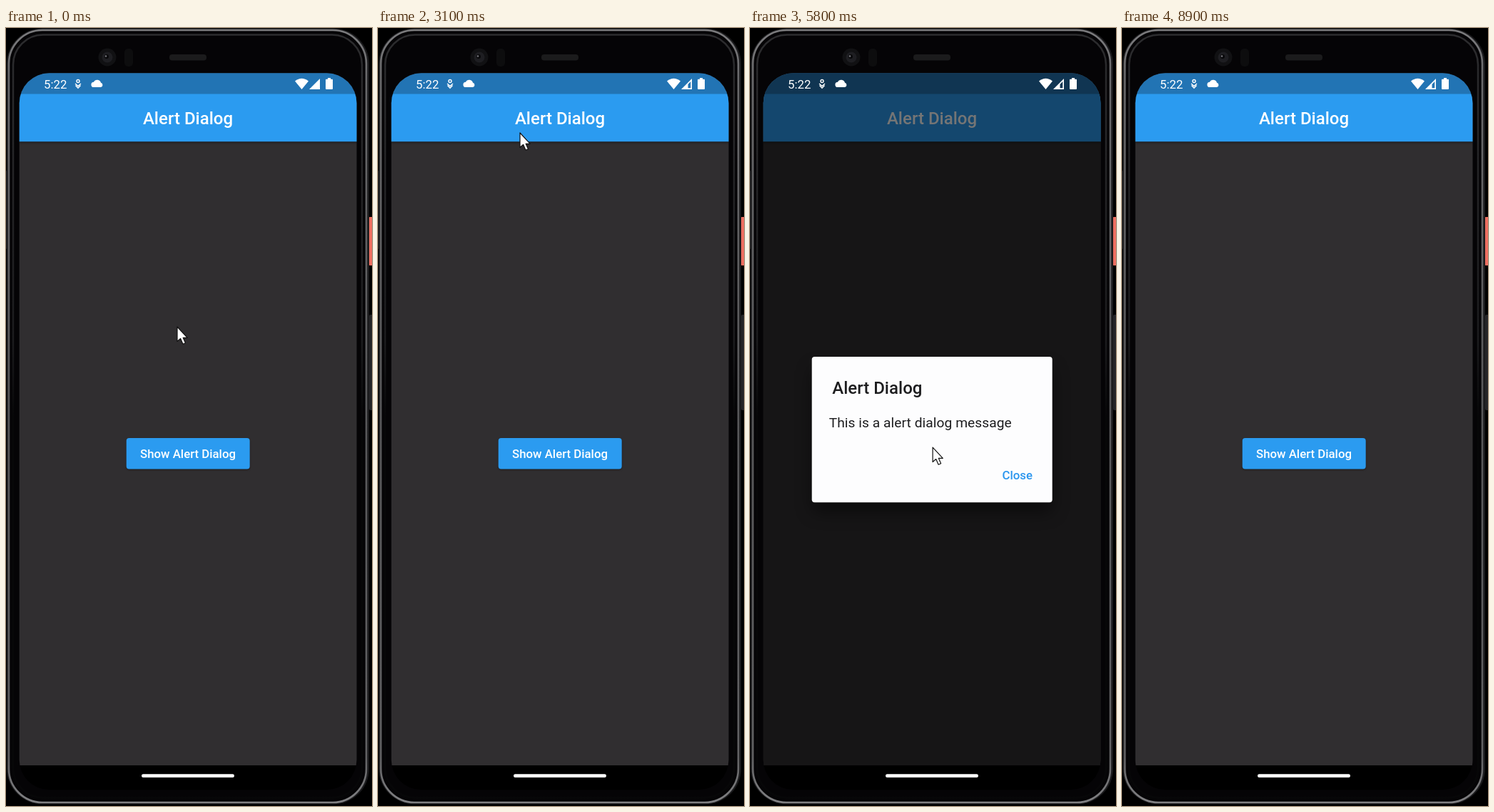
An HTML page that plays this animation: 513 px wide and 1091 px high, repeating every 9 s.

```html
<!DOCTYPE html>
<html lang="en">
<head>
<meta charset="utf-8">
<title>Alert Dialog</title>
<style>
  html, body { margin: 0; width: 100%; height: 100%; overflow: hidden; background: #000; }
  svg { display: block; width: 513px; height: 1091px; font-family: Roboto, sans-serif; }
  .medium { font-weight: 500; }
  .title { font-size: 24px; }
  .label { font-size: 16.8px; }
</style>
</head>
<body>
<svg viewBox="0 0 513 1091">
  <defs>
    <linearGradient id="edge" x2="0" y2="1">
      <stop offset="0" stop-color="#7c7c7e"/>
      <stop offset=".06" stop-color="#6a6a6c"/>
      <stop offset=".5" stop-color="#58585a"/>
      <stop offset=".94" stop-color="#626264"/>
      <stop offset="1" stop-color="#808082"/>
    </linearGradient>
    <linearGradient id="shine" x2="0" y2="1">
      <stop offset="0" stop-color="#2c2c2e"/>
      <stop offset=".4" stop-color="#1c1c1e"/>
      <stop offset=".5" stop-color="#070708"/>
    </linearGradient>
    <filter id="soft" x="-20%" y="-50%" width="140%" height="200%"><feGaussianBlur stdDeviation="1.5"/></filter>
    <filter id="deep" x="-20%" y="-30%" width="140%" height="160%"><feGaussianBlur stdDeviation="12"/></filter>
    <clipPath id="screen"><rect x="18.7" y="63.3" width="472.8" height="1005" rx="42"/></clipPath>
  </defs>

  <!-- phone body -->
  <rect x="0" y="200" width="3" height="110" rx="1" fill="#1d1d20"/>
  <rect x="508" y="265" width="8" height="68" rx="2" fill="#ed6e60"/>
  <rect x="509" y="402" width="8" height="134" rx="2" fill="#252528"/>
  <rect x="1" y="0.5" width="508" height="1088" rx="50" fill="#1b1b1d"/>
  <rect x="4" y="3" width="501" height="1083" rx="47" fill="#050406" stroke="url(#edge)" stroke-width="2.6"/>
  <rect x="10" y="9.500" width="489" height="1070" rx="42" fill="#050406" stroke="url(#shine)" stroke-width="2.500"/>
  <circle cx="142" cy="41" r="12.5" fill="#111113"/>
  <circle cx="142" cy="41" r="7.5" fill="#1e1e22"/>
  <circle cx="141" cy="40" r="3" fill="#08080a"/>
  <circle cx="140" cy="39.5" r="1.3" fill="#77777d"/>
  <rect x="166" y="29" width="12" height="25" rx="5" fill="#0d0d0e"/>
  <rect x="229" y="37" width="52" height="8.5" rx="4" fill="#1b1b1c"/>

  <!-- app -->
  <g clip-path="url(#screen)">
    <rect x="18" y="63" width="474" height="971" fill="#302e30"/>
    <rect x="18" y="154" width="474" height="6.500" opacity=".5" filter="url(#soft)"/>
    <rect x="18" y="63" width="474" height="30" fill="#2274b4"/>
    <rect x="18" y="92.500" width="474" height="66.800" fill="#2b9bf0"/>
    <text class="title medium" x="255" y="135" text-anchor="middle" fill="#fff">Alert Dialog</text>
    <rect x="169" y="576.500" width="172.500" height="43" rx="4" opacity=".4" filter="url(#soft)"/>
    <rect x="168.700" y="575" width="173" height="43.500" rx="4" fill="#2b9bf0"/>
    <text class="label medium" x="255" y="603" text-anchor="middle" fill="#fff">Show Alert Dialog</text>
    <rect id="dim" x="18" y="63" width="474" height="971" opacity="0"/>
    <rect x="18" y="1034" width="474" height="40"/>
  </g>
  <rect x="190" y="1046.300" width="130" height="4.700" rx="2.350" fill="#fff"/>

  <!-- status bar -->
  <g fill="#fff">
    <text class="label" x="53" y="85">5:22</text>
    <g fill="none" stroke="#fff" stroke-width="1.4">
      <circle cx="101" cy="74.5" r="2"/>
      <path d="M97 78l4 3.5 4-3.5M97.5 80.5l3.5 3.7 3.5-3.7"/>
    </g>
    <path d="M123 83a3.6 3.6 0 0 1 0-7.2a5.3 5.3 0 0 1 10 1a3.2 3.2 0 0 1 0 6.2z"/>
    <path d="M405 74.500q9.500-7.500 19 0l-9.500 11.500z"/>
    <path d="M425 86L440 71V86z"/>
    <path id="weak" d="M434.500 79L438.300 75V84.300H434.500z" fill="#2274b4"/>
    <path d="M451 70h4v1.800h2q1 0 1 1v12.200q0 1-1 1h-8q-1 0-1-1v-12.200q0-1 1-1h2z"/>
  </g>

  <g id="dialog" opacity="0">
    <rect x="88" y="478" width="335" height="200" rx="6" opacity=".5" filter="url(#deep)"/>
    <rect x="86.700" y="461" width="337" height="204.300" rx="4" fill="#fdfdfe"/>
    <g id="press">
      <rect x="339" y="606" width="74" height="43" rx="4" fill="#f6fafe"/>
      <circle cx="395" cy="627" r="14" fill="#e9f4fd"/>
    </g>
    <g fill="#1d1d1f">
      <text class="title medium" x="115.200" y="513">Alert Dialog</text>
      <text x="110.700" y="559.500" font-size="19.200" letter-spacing=".055">This is a alert dialog message</text>
    </g>
    <text class="label medium" x="353.500" y="633" fill="#2b96ee">Close</text>
  </g>

  <path id="cursor" d="M0 0V20.500L4.600 16.500L8 24.200L11.500 22.700L8.200 15.300H14.200z"
    fill="#fff" stroke="#111" stroke-width="1.200" stroke-linejoin="round"/>
</svg>
<script>
const LOOP = 9000, STEP = 100;
const [dim, dialog, press, weak, cursor] =
  ["dim", "dialog", "press", "weak", "cursor"].map(id => document.getElementById(id));

// pointer stops: time, x, y
const stops = [
  [0, 240, 419], [600, 265, 443], [1000, 352, 467], [1100, 390, 460],
  [1500, 395, 365], [2200, 285, 268], [3100, 199, 147], [3800, 247, 616],
  [4100, 245, 585], [5600, 245, 585], [6800, 395, 626], [8050, 395, 626],
  [8600, 530, 600], [LOOP, 530, 600]
];

const ramp = (t, start, length) => Math.min(1, Math.max(0, (t - start) / length));
const easeOut = u => 1 - (1 - u) ** 2;

// speed along one axis at a stop: zero at turning points, else the harmonic mean of both sides
function speed(i, axis) {
  if (i < 1 || i > stops.length - 2) return 0;
  const slope = j => (stops[j + 1][axis] - stops[j][axis]) / (stops[j + 1][0] - stops[j][0]);
  const a = slope(i - 1), b = slope(i);
  return a * b > 0 ? 2 * a * b / (a + b) : 0;
}

function pointer(t) {
  const i = stops.findIndex(s => s[0] > t) - 1;
  const from = stops[i], to = stops[i + 1];
  const span = to[0] - from[0], u = (t - from[0]) / span, v = 1 - u;
  return [1, 2].map(axis =>
    v * v * (1 + 2 * u) * from[axis] + u * u * (1 + 2 * v) * to[axis] +
    u * v * span * (v * speed(i, axis) - u * speed(i + 1, axis)));
}

function draw(now) {
  const t = Math.floor(now % LOOP / STEP) * STEP;
  const open = easeOut(ramp(t, 4330, 150) - ramp(t, 7220, 150));
  dim.setAttribute("opacity", .54 * open);
  dialog.setAttribute("opacity", open);
  press.setAttribute("visibility", t >= 7100 && t < 7400 ? "visible" : "hidden");
  weak.setAttribute("visibility", t >= 2000 ? "visible" : "hidden");
  weak.setAttribute("fill", open > .5 ? "#103653" : "#2274b4");
  cursor.setAttribute("transform", `translate(${pointer(t)})`);
}

const start = performance.now();
function tick() {
  draw(performance.now() - start);
  requestAnimationFrame(tick);
}
tick();
</script>
</body>
</html>
```
